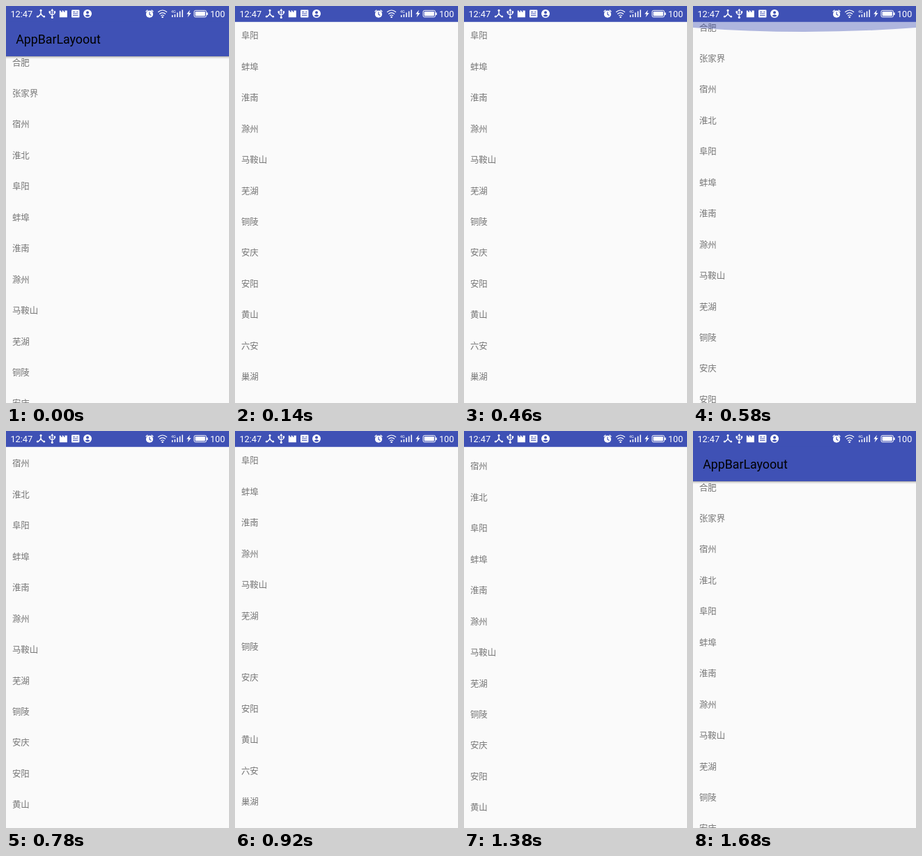
Recreate the animation shown at these times as an HTML page. Size 320 by 569 pixels, loop 1.7 s.

```html
<!DOCTYPE html>
<html lang="zh-CN">
<head>
<meta charset="utf-8">
<title>AppBarLayoout</title>
<style>
  html, body { margin: 0; width: 100%; height: 100%; overflow: hidden; background: #fafafa; }
  svg { display: block; width: 100%; height: 100%; }
  text { font-family: Roboto, sans-serif; }
  #list text { font: 12.44px "Noto Sans CJK SC", "Noto Sans CJK", "Noto Sans SC", sans-serif; fill: #757575; }
  .line { fill: none; stroke: #fff; }
  .cut { fill: none; stroke: #3f51b5; }
</style>
</head>
<body>
<svg viewBox="0 0 320 569">
  <defs>
    <linearGradient id="shade" x2="0" y2="1">
      <stop stop-opacity=".36"/>
      <stop offset=".4" stop-opacity=".13"/>
      <stop offset="1" stop-opacity="0"/>
    </linearGradient>
  </defs>
  <rect width="320" height="569" fill="#fafafa"/>
  <g id="list"></g>
  <path id="glow" fill="#3f51b5"/>
  <g id="bar">
    <rect id="shadow" y="72" width="320" height="4" fill="url(#shade)"/>
    <rect y="20" width="320" height="52" fill="#3f51b5"/>
    <text x="14.2" y="54" font-size="17.78">AppBarLayoout</text>
  </g>
  <rect width="320" height="22.8" fill="#3f51b5"/>
  <g fill="#fff">
    <text x="6.4" y="15.6" font-size="12.8">12:47</text>
    <text x="293" y="15.6" font-size="12.6">100</text>
    <!-- node -->
    <path class="line" stroke-width="1.3" d="M50 6v4.5Q49 14 45 15.5M50 10.5Q51 14 55 15.5"/>
    <circle cx="50" cy="6.2" r="1.5"/><circle cx="45.3" cy="15.2" r="1.4"/><circle cx="54.7" cy="15.2" r="1.4"/>
    <!-- usb -->
    <path class="line" stroke-width="1.2" d="M66.3 6v10M62.8 8.5v2.3l3.5 2.4 3.5-2.4V8.5"/>
    <path d="M64.2 7l2.1-3.2L68.4 7zM61.5 7.3h2.6v2.6h-2.6zM68.5 7.3h2.6v2.6h-2.6z"/>
    <circle cx="66.3" cy="16.4" r="1.6"/>
    <!-- clapper -->
    <path d="M76.8 6.4h1.6l1 2h1.8l-1-2h2l1 2H85l-1-2h3.8v9.9h-11z"/>
    <!-- news -->
    <rect x="94" y="5.6" width="11.4" height="10.8" rx="1.2"/>
    <path class="cut" d="M96 8.5h3.5M96 11h7.4M96 13.6h7.4M101 8.5h2.4"/>
    <!-- account -->
    <circle cx="117" cy="11" r="6"/>
    <path fill="#3f51b5" d="M113.4 14q3.6-3.4 7.2 0-3.6 2.8-7.2 0z"/>
    <circle cx="117" cy="9.2" r="2" fill="#3f51b5"/>
    <!-- alarm -->
    <circle cx="206" cy="11.7" r="5.1"/>
    <path class="cut" stroke-width="1.1" d="M206 8.6v3.5l2.4 1.3"/>
    <path class="line" stroke-width="1.4" d="M200.6 8.2l2.8-2.4M211.4 8.2l-2.8-2.4"/>
    <!-- wifi -->
    <path class="line" stroke-width="1.2" d="M218.2 8.8q6.4-5.6 12.8 0M220.2 11.5q4.4-3.8 8.8 0M222.2 14q2.4-2 4.8 0"/>
    <circle cx="224.6" cy="15.9" r="1.2"/>
    <!-- signal -->
    <text x="237" y="9.6" font-size="5.4">4G</text>
    <path class="line" stroke-width="1.5" d="M238.7 16v-3M242.4 16v-4M246 16V9.6M249.6 16V7.6M253.2 16V5.6"/>
    <!-- battery -->
    <path d="M264 5.8l-4.8 5.8h2.8l-1.4 4.6 5-6.2h-2.8z"/>
    <rect class="line" x="270" y="6.4" width="17.4" height="9.4" rx="1.8"/>
    <rect x="271.6" y="8" width="14.2" height="6.2" rx=".6"/>
    <rect x="288" y="9.2" width="1.6" height="3.8" rx=".6"/>
  </g>
</svg>
<script>
  const $ = id => document.getElementById(id);
  const PERIOD = 1700, STEP = 20, TOOLBAR = 50, ROW = 44.44;
  const cities = '合肥 张家界 宿州 淮北 阜阳 蚌埠 淮南 滁州 马鞍山 芜湖 铜陵 安庆 安阳 黄山 六安 巢湖'.split(' ');
  $('list').innerHTML = cities
    .map((name, i) => `<text x="8.9" y="${85.6 + i * ROW}">${name}</text>`).join('');

  // [time, total scroll]; the first 50 px hide the toolbar
  const scrollKeys = [
    [0, 0], [140, 216], [260, 50], [350, 50], [460, 216], [570, 50], [660, 50],
    [920, 216], [1170, 0], [1240, 0], [1380, 119], [1620, 0], [PERIOD, 0]
  ];

  function scrollAt(t) {
    const i = scrollKeys.findIndex(k => k[0] > t);
    const [t0, a] = scrollKeys[i - 1], [t1, b] = scrollKeys[i];
    const ease = (1 - Math.cos(Math.PI * (t - t0) / (t1 - t0))) / 2;
    return a + (b - a) * ease;
  }

  // Overscroll flash that fades after each fling reaches the top
  function glowAt(t) {
    const start = t < 500 ? 260 : 580;
    return t < start ? 0 : Math.max(0, 1 - (t - start) / 100);
  }

  function draw(now) {
    const t = Math.floor(now % PERIOD / STEP) * STEP;
    const scroll = scrollAt(t), hidden = Math.min(scroll, TOOLBAR), glow = glowAt(t);
    $('list').setAttribute('transform', `translate(0 ${-scroll})`);
    $('bar').setAttribute('transform', `translate(0 ${-hidden})`);
    $('shadow').setAttribute('opacity', hidden < TOOLBAR ? 1 : 0);
    const edge = 22 + 9 * glow;
    $('glow').setAttribute('d', `M0 22V${edge}Q160 ${edge + 12 * glow} 320 ${edge}V22z`);
    $('glow').setAttribute('opacity', glow ? 0.1 + 0.3 * glow : 0);
  }

  function tick() {
    draw(performance.now());
    requestAnimationFrame(tick);
  }
  tick();
</script>
</body>
</html>
```
